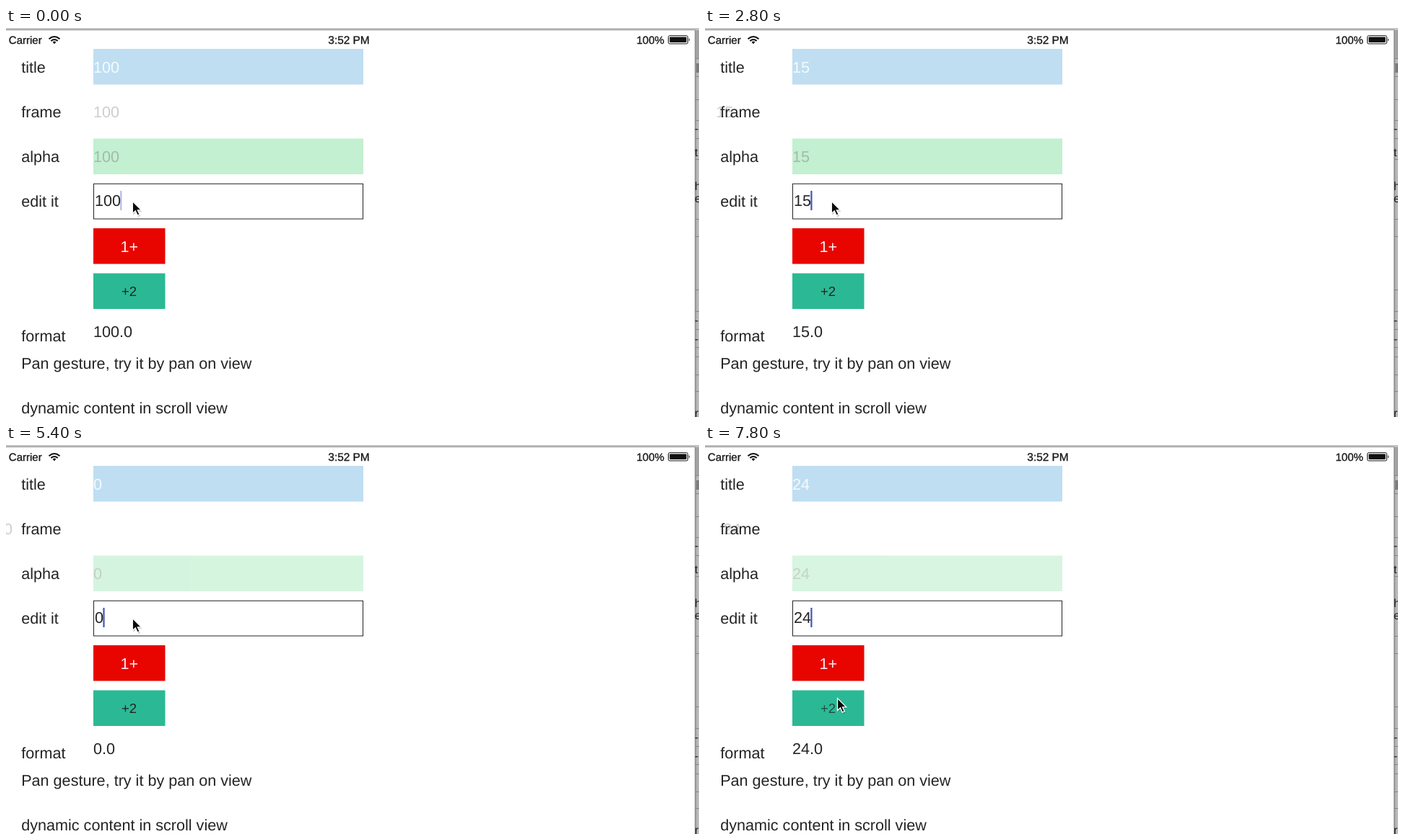
Animation of 960 by 540 pixels, one loop 8000 ms. Source, as an HTML page:

```html
<!DOCTYPE html>
<html lang="en">
<head>
<meta charset="utf-8">
<title>Bound values</title>
<style>
  html, body { margin: 0; width: 100%; height: 100%; overflow: hidden; background: #fff; }
  svg { display: block; width: 960px; height: 540px; }
  text { font: 21.6px "Liberation Sans", Arial, sans-serif; fill: #242424; white-space: pre;
         text-rendering: geometricPrecision; }
  .status text { font-size: 15px; fill: #1a1a1a; stroke: #1a1a1a; stroke-width: .35px; }
  .edge text { font-size: 16px; fill: #222; }
</style>
</head>
<body>
<svg viewBox="0 0 960 540">
  <defs>
    <linearGradient id="shade">
      <stop offset="0" stop-color="#8c8c8c"/>
      <stop offset=".5" stop-color="#b4b4b4"/>
      <stop offset="1" stop-color="#c0c0c0"/>
    </linearGradient>
  </defs>
  <rect width="960" height="540" fill="#fff"/>
  <rect width="960" height="3" fill="#c4c4c4"/>
  <rect y="2" width="955" height="1.2" fill="#999"/>

  <g class="edge">
    <rect x="954" y="3" width="6" height="537" fill="url(#shade)"/>
    <rect x="955" y="3" width="5" height="39" fill="#a2a2a2"/>
    <rect x="956" y="49" width="4" height="13" fill="#7c7c7c"/>
    <path id="rules" stroke="#858585"/>
    <g id="scraps"></g>
  </g>

  <g class="status">
    <text x="3.8" y="22.3">Carrier</text>
    <text x="475" y="22.3" text-anchor="middle" style="font-size:15.4px">3:52 PM</text>
    <text x="873.5" y="22.3">100%</text>
    <g fill="none" stroke="#111" stroke-width="2">
      <path d="M59.5 15.2Q67 8.8 74.5 15.2M62.3 18.1Q67 14 71.7 18.1"/>
      <path d="M64.6 19.6Q67 17.6 69.4 19.6L67 22.2Z" fill="#111" stroke="none"/>
      <rect x="917.5" y="10.7" width="27" height="11.2" rx="2" stroke-width="1"/>
      <rect x="919.3" y="12.5" width="23.4" height="7.6" rx=".8" fill="#111" stroke="none"/>
      <path d="M946 14q2 2.3 0 4.6z" fill="#111" stroke="none"/>
    </g>
  </g>

  <rect x="121" y="29" width="374" height="49.5" fill="#bfdef2"/>
  <text id="title" x="121" y="61.5" style="fill:#f5fafd"></text>
  <text id="frame" y="123.7" style="fill:#cdcdcd"></text>
  <g id="alpha">
    <rect x="121" y="153.5" width="374" height="49.5" fill="#c2f0d0"/>
    <text id="alphaText" x="121" y="186" style="fill:#a5b9aa"></text>
  </g>
  <rect x="121.5" y="216.3" width="373" height="48.7" fill="#fff" stroke="#222"/>
  <text id="edit" x="123" y="247.3"></text>
  <rect id="caret" y="226" width="2.2" height="27" fill="#3f58b5"/>

  <rect x="121" y="278" width="99.5" height="49.5" fill="#e80500"/>
  <text x="170.7" y="310.6" text-anchor="middle" style="fill:#fbeeee">1+</text>
  <rect x="121" y="340.5" width="99.5" height="49.5" fill="#2bb995"/>
  <text id="plus" x="170.5" y="371.6" text-anchor="middle" style="font-size:18.6px">+2</text>
  <text id="format" x="121" y="429.3"></text>
  <g id="labels"></g>

  <g id="cursor">
    <path d="M0 0V17L4 13.4L6.8 19.6L9.8 18.2L7 12.3H12.2Z" fill="#000" opacity=".25" transform="translate(1 2)"/>
    <path d="M0 0V17L4 13.4L6.8 19.6L9.8 18.2L7 12.3H12.2Z" fill="#0a0a0a" stroke="#fff" stroke-width="1.3"/>
  </g>
</svg>
<script>
const LOOP = 8000, STEP = 200, FADE = 600;
// [time, value]
const changes = [[-5000, 100], [1395, 10], [1595, 1], [2795, 15], [4595, 1], [4995, 0],
                 [5595, 2], [5795, 20], [6936, 22], [7416, 24]];
// [time, opacity]
const blinks = [[0, .4], [200, 0], [400, 1], [2600, .4], [2800, 1], [3800, .4], [4000, 0],
                [4200, 1], [6800, .4], [7000, 1]];

const $ = id => document.getElementById(id);
const svgNS = "http://www.w3.org/2000/svg";

function addText(parent, x, y, content) {
  const node = document.createElementNS(svgNS, "text");
  node.setAttribute("x", x);
  node.setAttribute("y", y);
  node.textContent = content;
  parent.append(node);
}

[["title", 61.5], ["frame", 123.7], ["alpha", 186], ["edit it", 248.2], ["format", 435],
 ["Pan gesture, try it by pan on view", 472.6], ["dynamic content in scroll view", 535]]
  .forEach(([label, y]) => addText($("labels"), 21.2, y, label));

$("rules").setAttribute("d", [42, 67, 99, 128, 153, 182, 265, 289, 363, 393, 418, 443, 456, 481, 504]
  .map(y => `M955 ${y}.5h5`).join(""));
[["t", 178], ["h", 225], ["e", 242], ["-", 145], ["-", 411], ["-", 437], ["r", 540]]
  .forEach(([letter, y]) => addText($("scraps"), 954, y, letter));

const indexAt = (table, t) => table.findLastIndex(row => row[0] <= t);
const labelX = value => value * 1.245 - 3.5;

function draw(t) {
  const i = indexAt(changes, t);
  const [start, value] = changes[i];
  const age = t - start;
  // The new layout shows for one step before its animation begins.
  const progress = age < STEP ? 1 : Math.min(1, age / FADE);
  const from = labelX(i ? changes[i - 1][1] : value);
  const text = String(value);

  for (const id of ["title", "frame", "alphaText", "edit"]) $(id).textContent = text;
  $("format").textContent = value.toFixed(1);
  $("frame").setAttribute("x", from + (labelX(value) - from) * progress);
  $("alpha").setAttribute("opacity", progress);

  $("caret").setAttribute("x", 122.5 + text.length * 11.9);
  $("caret").setAttribute("opacity", blinks[indexAt(blinks, t)][1]);

  const pressed = start > 6900;
  const glow = age < STEP ? .25 : .25 + .75 * progress;
  $("plus").setAttribute("opacity", pressed ? glow : 1);

  const move = Math.min(1, Math.max(0, (t - 6400) / 400));
  $("cursor").setAttribute("transform", `translate(${175.3 + 8.2 * move} ${240.5 + 111 * move})`);
}

const origin = performance.now();
function tick() {
  const t = (performance.now() - origin) % LOOP;
  draw(Math.floor(t / STEP) * STEP);
  requestAnimationFrame(tick);
}
tick();
</script>
</body>
</html>
```
